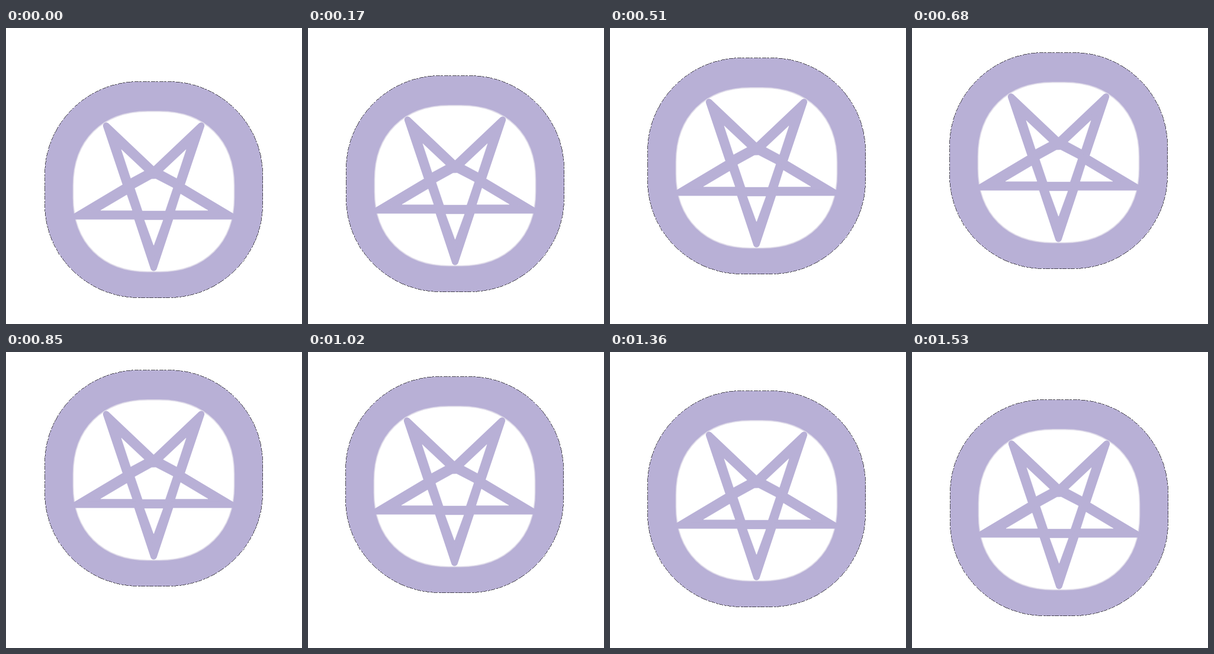
These frames come from a looping animation (500x500 px, 1700 ms). An HTML page:

```html
<!DOCTYPE html>
<html lang="en">
<head>
<meta charset="utf-8">
<title>Floating star badge</title>
<style>
  html, body { margin: 0; width: 100%; height: 100%; overflow: hidden; background: #fff; }
  svg { display: block; width: 100%; height: 100%; }
</style>
</head>
<body>
<svg viewBox="0 0 500 500">
  <g id="badge">
    <path id="rim" fill="#b8b0d6" stroke="#29262f" stroke-width=".8" stroke-dasharray="7 1 4 2" shape-rendering="crispEdges"/>
    <path id="window" fill="#fff" stroke="#dfdbe9" stroke-width="1.6"/>
    <path id="star" fill="#b8b0d6" stroke="#b8b0d6" stroke-width="11" stroke-linejoin="round"/>
    <path id="holes" fill="#fff" stroke="#fff" stroke-width=".6" stroke-linejoin="round"/>
  </g>
</svg>
<script>
const AXIS = 249.5;
const STEP_MS = 170;
const POSES = [[0, 0], [-1, -10], [-2, -25], [-2, -40], [-2, -49], [0, -60]];

const byId = id => document.getElementById(id);
const setPath = (id, d) => byId(id).setAttribute('d', d);
const polygon = points => 'M' + points.join('L') + 'Z';
const mirror = points => points.map(([x, y]) => [2 * AXIS - x, y]);

// Four cubic corners joined by short straight sides of half-length `flat`.
function roundedBox(cx, cy, rx, ry, flat, handle) {
  const corner = (sx, sy, flip) => {
    const px = rx - (rx - flat) * (1 - handle);
    const py = ry - (ry - flat) * (1 - handle);
    const points = [
      [rx, flat],
      [rx, py],
      [px, ry],
      [flat, ry]
    ].map(([x, y]) => [cx + sx * x, cy + sy * y]);
    if (flip) points.reverse();
    return `L${points[0]}C${points.slice(1).join(' ')}`;
  };
  return `M${cx - rx},${cy}` + corner(-1, -1) + corner(1, -1, true) +
    corner(1, 1) + corner(-1, 1, true) + 'Z';
}

const leftSide = [[169.3, 165], [203.5, 267], [118, 318], [220.7, 318]];
const upperHole = [[195, 205.5], [210.8, 253.6], [233.3, 241.4]];
const leftArmHole = [[160, 308], [204, 282], [213, 308]];
const rightArmHole = [[341, 308], [295, 280.6], [286.3, 308]];
const pentagon = [[217.8, 270.8], [246, 255.2], [253, 255], [282, 270], [269, 308.5], [230.5, 308.5]];
const lowerHole = [[234, 324.5], [265, 324.5], [249.5, 367]];

setPath('rim', roundedBox(AXIS, 273, 184, 182.5, 25, 0.55));
setPath('window', roundedBox(AXIS, 276.3, 136, 135.4, 10, 0.61));
setPath('star', polygon([[AXIS, 241], ...leftSide, [AXIS, 405], ...mirror(leftSide).reverse()]));
setPath('holes', [upperHole, mirror(upperHole), leftArmHole, rightArmHole, pentagon, lowerHole]
  .map(polygon).join(''));

// Steps up through the poses, then back down the same way.
function draw() {
  const step = Math.floor(performance.now() / STEP_MS) % 10;
  const [x, y] = POSES[Math.min(step, 10 - step)];
  byId('badge').setAttribute('transform', `translate(${x} ${y})`);
  requestAnimationFrame(draw);
}
draw();
</script>
</body>
</html>
```
